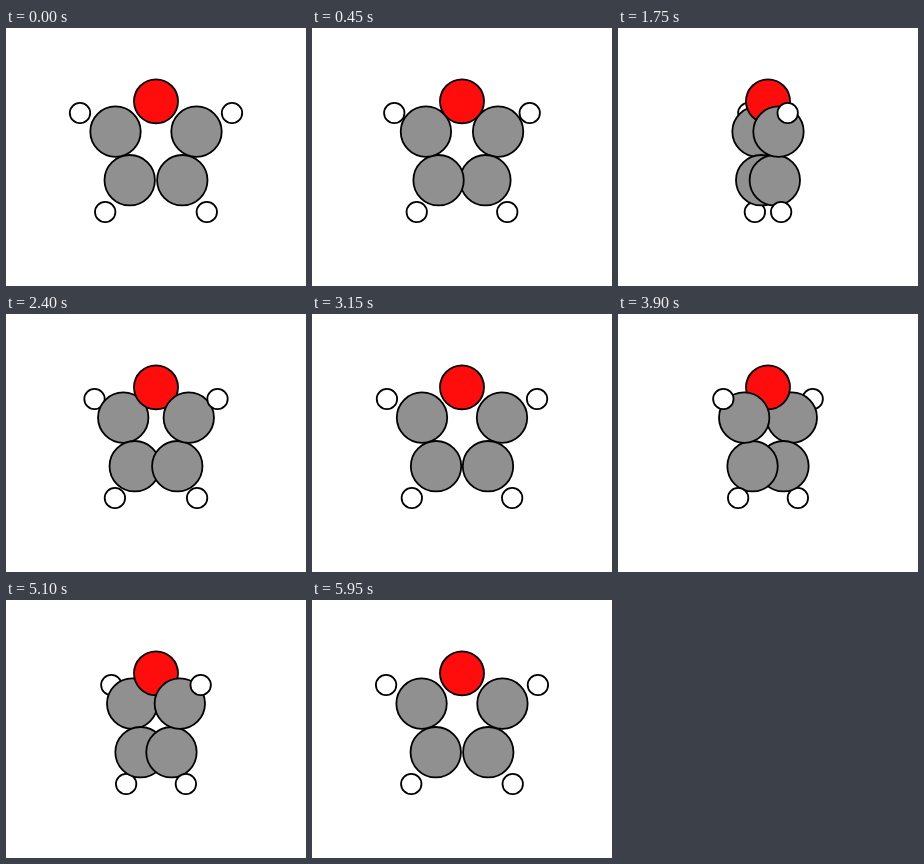
An HTML page for the animation above (6 s loop, 300 by 258 pixels).

```html
<!DOCTYPE html>
<html lang="en">
<head>
<meta charset="utf-8">
<title>Rotating ring molecule</title>
<style>
  html, body { margin: 0; width: 100%; height: 100%; overflow: hidden; background: #fff; }
  svg { display: block; width: 300px; height: 258px; }
  circle { stroke: #000; stroke-width: 1.8; }
  .oxygen { fill: #ff0d0d; }
  .carbon { fill: #909090; }
  .hydrogen { fill: #fff; }
</style>
</head>
<body>
<svg id="stage" viewBox="0 0 300 258"></svg>
<script>
  const LOOP = 6000, STEP = 50, AXIS = 150;
  const RADIUS = { oxygen: 22, carbon: 25.2, hydrogen: 10.2 };
  const stage = document.getElementById('stage');

  // offset: signed distance from the vertical rotation axis
  function atom(kind, offset, y) {
    const el = document.createElementNS('http://www.w3.org/2000/svg', 'circle');
    el.setAttribute('class', kind);
    el.setAttribute('r', RADIUS[kind]);
    el.setAttribute('cy', y);
    return { el, offset };
  }

  const pair = (kind, offset, y) => [atom(kind, -offset, y), atom(kind, offset, y)];

  const atoms = [
    atom('oxygen', 0, 73.3),
    ...pair('carbon', 26.3, 152.2),
    ...pair('carbon', 40.5, 103.6),
    ...pair('hydrogen', 50.8, 184),
    ...pair('hydrogen', 76, 85)
  ];

  let shown = -1;

  function draw(time) {
    const step = Math.floor((time % LOOP) / STEP);
    if (step !== shown) {
      shown = step;
      const angle = 2 * Math.PI * step * STEP / LOOP;
      const depth = a => -a.offset * Math.sin(angle);
      for (const a of atoms) a.el.setAttribute('cx', AXIS + a.offset * Math.cos(angle));
      // paint from back to front
      const order = [...atoms].sort((a, b) => depth(a) - depth(b));
      stage.replaceChildren(...order.map(a => a.el));
    }
  }

  const start = performance.now();
  function tick() {
    draw(performance.now() - start);
    requestAnimationFrame(tick);
  }
  tick();
</script>
</body>
</html>
```
